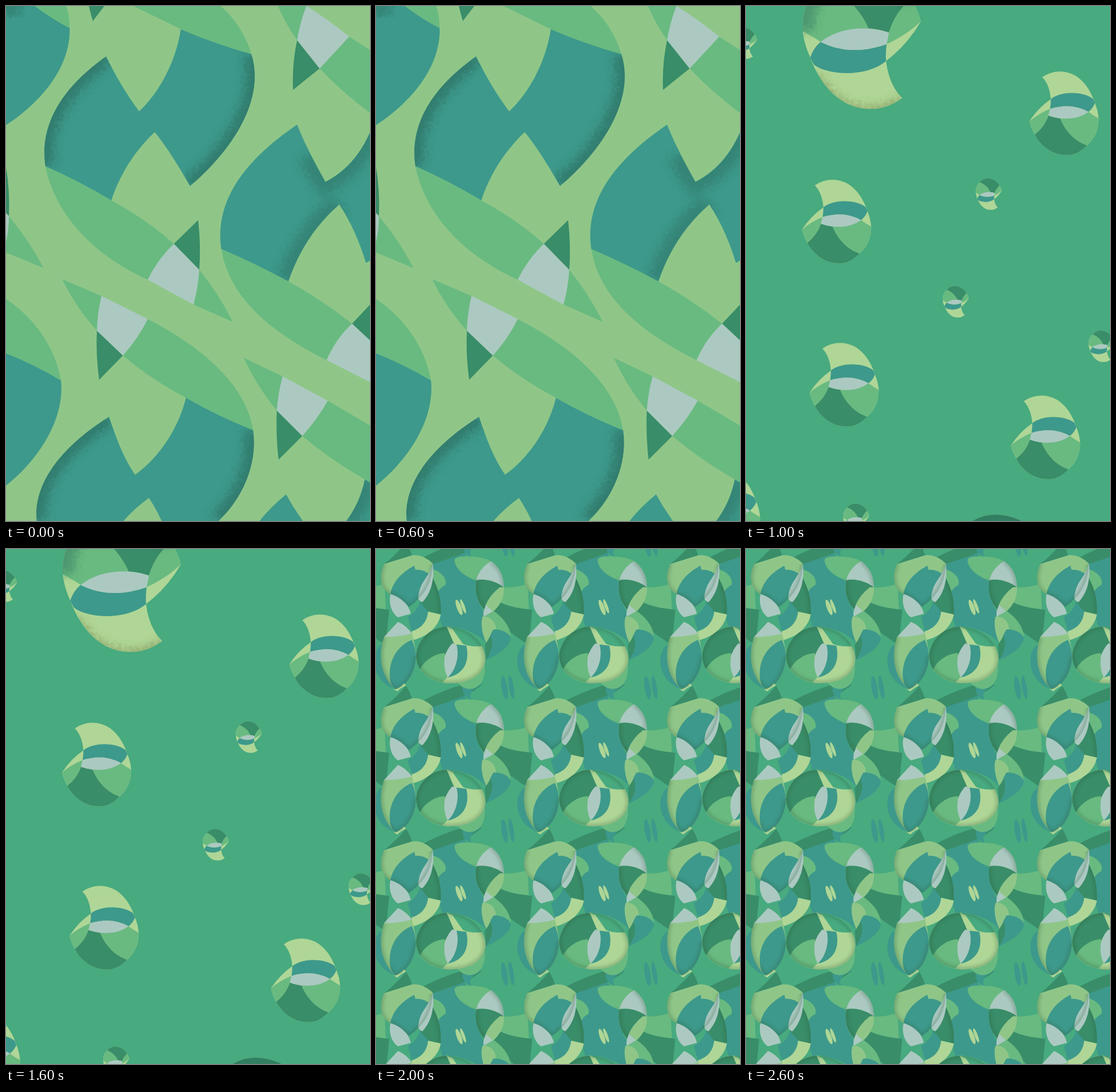
These frames come from a looping animation (629 px wide and 890 px high, 3 s). An HTML page:

```html
<!DOCTYPE html>
<html lang="en">
<head>
<meta charset="utf-8">
<title>Green patterns</title>
<style>
  html, body { margin: 0; width: 100%; height: 100%; overflow: hidden; background: #48aa7f; }
  svg { display: block; width: 100vw; height: 100vh; }
  .scene { visibility: hidden; animation: turn 3s step-end infinite; }
  .scene:nth-of-type(2) { animation-delay: -2s; }
  .scene:nth-of-type(3) { animation-delay: -1s; }
  @keyframes turn {
    0% { visibility: visible; }
    33.333%, 100% { visibility: hidden; }
  }
  .light { fill: #8fc688; }
  .teal { fill: #3d998b; }
  .mid { fill: #69ba80; }
  .dark { fill: #398d68; }
  .grey { fill: #abc9c1; }
  .lime { fill: #afd696; }
  .base { fill: #48aa7f; }
  .shade { fill: none; stroke: #2c6a5b; stroke-width: 32; opacity: .6; filter: url(#grain); }
  .faint { stroke-width: 40; opacity: .42; }
  .olive { stroke: #7d8a52; stroke-width: 20; }
  .soft { fill: none; stroke: #2f5a3c; stroke-width: 6; opacity: .36; filter: url(#blur); }
</style>
</head>
<body>
<svg viewBox="0 0 629 890" preserveAspectRatio="none">
  <defs>
    <filter id="grain" x="-50%" y="-50%" width="200%" height="200%">
      <feGaussianBlur stdDeviation="8" result="soft"/>
      <feTurbulence type="fractalNoise" baseFrequency=".18" numOctaves="2" seed="4"/>
      <feDisplacementMap in="soft" scale="18" xChannelSelector="R" yChannelSelector="G"/>
    </filter>
    <filter id="blur" x="-30%" y="-30%" width="160%" height="160%">
      <feGaussianBlur stdDeviation="3"/>
    </filter>

    <path id="leafA" d="M173 87C113 130 56 192 68 277Q125 302 182 336C195 295 222 250 257 218C280 246 300 280 318 311C385 255 450 165 424 83Q360 65 302 40C294 95 265 150 230 182C208 152 190 122 173 87Z"/>
    <path id="leafB" d="M503 205C430 255 358 325 372 420Q430 445 488 476C505 425 535 378 576 343C597 375 611 408 622 444L629 440V218C612 258 585 287 552 304C533 270 517 240 503 205Z"/>
    <path id="leafC" d="M178 710C104 756 46 820 53 890H203Q220 870 247 850Q260 870 269 890H367C410 850 435 790 427 733Q365 708 311 677C298 730 265 780 223 810C202 780 190 745 178 710Z"/>
    <path id="leafD" d="M620 818L629 823V890H588Q612 858 620 818Z"/>
    <path id="leafE" d="M0 0H50Q82 24 110 38C112 110 55 170 0 206Z"/>
    <clipPath id="inA"><use href="#leafA"/></clipPath>
    <clipPath id="inB"><use href="#leafB"/></clipPath>
    <clipPath id="inC"><use href="#leafC"/></clipPath>
    <clipPath id="inD"><use href="#leafD"/></clipPath>
    <clipPath id="inE"><use href="#leafE"/></clipPath>

    <path id="rim" d="M98 44C97 10 105 -15 129 -37C148 -60 170 -69 191 -69C235 -69 268 -42 285 -12Q298 8 302 27Q278 68 242 95Q247 137 270 159Q245 178 215 178C165 178 130 140 111 89Q101 68 98 44Z"/>
    <clipPath id="inRim"><use href="#rim"/></clipPath>
    <g id="ball">
      <use href="#rim" class="lime"/>
      <path class="mid" d="M98 44C97 10 105 -15 129 -37C165 -27 196 3 212 39Q160 42 129 62Q113 51 98 44Z"/>
      <path class="dark" d="M129 -37C148 -60 170 -69 191 -69C235 -69 268 -42 285 -12Q257 12 247 46Q230 40 212 39C196 3 165 -27 129 -37Z"/>
      <path class="mid" d="M285 -12Q298 8 302 27Q276 51 243 66L247 46Q257 12 285 -12Z"/>
      <path class="teal" d="M129 62Q116 73 111 89L117 101C142 121 210 123 242 95Q241 82 243 66Q180 88 129 62Z"/>
      <path class="grey" d="M129 62C160 37 208 33 247 46L243 66Q180 88 129 62Z"/>
    </g>
    <g id="bigBall">
      <use href="#ball"/>
      <g clip-path="url(#inRim)">
        <path class="shade olive" d="M118 122C142 166 178 186 215 184Q248 184 276 163"/>
        <path class="shade faint" d="M98 44C97 10 105 -15 129 -37C148 -60 170 -69 191 -69C235 -69 268 -42 285 -12"/>
      </g>
    </g>
    <use id="turned" href="#ball" transform="rotate(182.5) scale(.5834) translate(-302 -27)"/>
    <use id="tiny" href="#ball" transform="scale(.221) translate(-302 -27)"/>

    <g id="back">
      <path class="teal" d="M80 26L150 -13L155 13L136 20C140 45 165 50 173 56C170 90 185 100 190 120L192 165C178 146 150 134 115 136L105 100Z"/>
      <path class="dark" d="M65 24Q105 0 150 -13L183 -13Q165 4 130 15L70 36Z"/>
      <path class="teal" d="M150 -11Q147 8 165 13Q156 -1 183 -13Z"/>
      <path class="mid" d="M216 66Q240 68 262 60L264 104C240 102 220 96 207 88Z"/>
      <path class="dark" d="M207 88C222 98 240 102 270 105L264 166C240 150 215 135 203 107Z"/>
      <path class="teal" d="M10 165C-10 177 -10 225 30 241Z"/>
      <g class="lime">
        <ellipse cx="143.500" cy="101" rx="4" ry="14" transform="rotate(-20 143.500 101)"/>
        <ellipse cx="150.500" cy="99" rx="2.800" ry="13" transform="rotate(-20 150.500 99)"/>
      </g>
      <g class="teal">
        <ellipse cx="222" cy="240" rx="5" ry="20.500" transform="rotate(-9 222 240)"/>
        <ellipse cx="234" cy="239" rx="4" ry="20.500" transform="rotate(-9 234 239)"/>
      </g>
    </g>

    <path id="hoop" d="M62 11L14 26C4 48 8 70 25 78C35 80 48 90 57 100C83 82 98 58 98 25L70 35Z"/>
    <path id="egg" d="M38 126L14 152C4 180 6 220 35 243C55 235 68 210 69 185C68 170 65 155 62 146Q52 132 38 126Z"/>
    <path id="orb" d="M69 185C72 155 95 135 122 134C160 135 188 160 189 190C188 215 165 233 123 232C95 228 72 215 69 185Z"/>
    <path id="bean" d="M136 22C134 15 142 12 160 13Q185 13 199 21C212 30 221 45 221 66L216 66C215 75 208 85 202 90L190 108C178 94 170 82 173 54C155 48 138 35 136 22Z"/>
    <path id="cap" d="M98 50C108 70 113 85 112 113L90 108L76 91C90 77 97 65 98 50Z"/>
    <clipPath id="inHoop"><use href="#hoop"/></clipPath>
    <clipPath id="inEgg"><use href="#egg"/></clipPath>
    <clipPath id="inOrb"><use href="#orb"/></clipPath>
    <clipPath id="inBean"><use href="#bean"/></clipPath>
    <clipPath id="inCap"><use href="#cap"/></clipPath>

    <g id="front">
      <path class="dark" d="M14 26Q35 10 52 -11Q59 0 62 11Z"/>
      <use href="#hoop" class="teal"/>
      <path class="light" d="M62 11L14 26C4 48 8 70 25 78C28 58 44 40 68 28Z"/>
      <path class="light" d="M62 11Q80 8 98 25Q98 37 95 46Q82 34 68 36Z"/>
      <path class="mid" d="M97 35C114 39 123 52 120 62Q112 66 107 74L96 58Z"/>
      <path class="base" d="M57 100Q70 91 76 80L90 108L62 130L50 117Z"/>
      <path class="teal" d="M62 142C79 138 90 127 92 108L76 91Q72 107 55 118Z"/>
      <path class="lime" d="M112 113C108 135 88 152 62 158Q61 147 62 142C76 138 88 128 90 108Z"/>
      <use href="#cap" class="dark"/>
      <path class="grey" d="M98 25C102 54 94 78 80 92Q74 90 73 84C75 56 92 50 98 25Z"/>
      <path class="grey" d="M25 78C21 95 28 112 38 118L60 112C57 95 41 82 25 78Z"/>
      <g clip-path="url(#inHoop)"><path class="soft" d="M14 26C4 48 8 70 25 78C35 80 48 90 57 100C83 82 98 58 98 25"/></g>
      <g clip-path="url(#inCap)"><path class="soft" d="M98 50C108 70 113 85 112 113"/></g>

      <use href="#egg" class="light"/>
      <path class="grey" d="M38 126L14 152Q40 152 62 146Q52 132 38 126Z"/>
      <path class="teal" d="M62 157C30 170 18 205 26 232Q30 240 35 243C55 235 69 210 69 185Q68 170 62 157Z"/>
      <path class="lime" d="M31 243Q42 240 48 232L52 236Q44 239 37 246Z"/>
      <g clip-path="url(#inEgg)"><path class="soft" d="M14 152C4 180 6 220 35 243C55 235 68 210 69 185"/></g>

      <path class="mid" d="M188 198C190 225 180 242 160 242Q147 240 138 228C165 230 185 215 188 198Z"/>
      <use href="#orb" class="lime"/>
      <path class="dark" d="M69 185C72 155 95 135 122 134L135 164Q122 175 119 184L76 208Q70 198 69 185Z"/>
      <path class="mid" d="M76 208C85 190 105 180 119 180Q117 206 124 221L114 231Q89 226 76 208Z"/>
      <path class="base" d="M122 134C150 134 178 148 187 167C165 171 136 167 122 134Z"/>
      <path class="lime" d="M122 134L132 138L153 168L137 163Z"/>
      <path class="grey" d="M132 163C115 180 115 205 124 222C140 207 144 182 139 165Z"/>
      <path class="teal" d="M139 165C144 182 140 207 124 222C154 216 162 192 156 167Z"/>
      <g clip-path="url(#inOrb)"><use href="#orb" class="soft"/></g>

      <use href="#bean" class="mid"/>
      <path class="dark" d="M173 54C188 50 208 56 221 66L216 66C215 75 208 85 202 90L190 108C178 94 170 82 173 54Z"/>
      <path class="grey" d="M199 21C212 30 221 45 221 66C208 56 188 50 173 54C177 40 186 28 199 21Z"/>
      <g clip-path="url(#inBean)"><path class="soft" d="M199 21C212 30 221 45 221 66M190 108C178 94 170 82 173 54"/></g>
      <path class="light" d="M221 66C222 85 214 97 203 108L189 98Q196 80 214 66Z"/>
      <path class="grey" d="M190 97L203 108L186 118Q184 108 190 97Z"/>
      <path class="mid" d="M203 107C225 122 233 140 233 153Q218 140 203 139Q203 124 186 117Z"/>
      <path class="light" d="M184 117C195 115 208 125 207 140L192 165C184 150 180 130 184 117Z"/>
      <path class="teal" d="M203 139C220 138 233 148 233 155C230 170 212 182 190 192C188 175 195 150 203 139Z"/>
      <path class="dark" d="M188 166L198 150Q206 168 190 192Z"/>
    </g>
  </defs>

  <g class="scene">
    <rect class="light" width="629" height="890"/>
    <g class="teal">
      <use href="#leafA"/><use href="#leafB"/><use href="#leafC"/><use href="#leafD"/><use href="#leafE"/>
      <path d="M0 600Q50 620 95 647C102 715 55 785 0 829Z"/>
      <path d="M484 844Q458 865 438 890H513Q497 868 484 844Z"/>
    </g>
    <g clip-path="url(#inA)"><path class="shade" d="M173 87C113 130 56 192 68 277M318 311C385 255 450 165 424 83"/></g>
    <g clip-path="url(#inB)"><path class="shade faint" d="M629 218C612 258 585 287 552 304Q537 284 524 257M488 476C505 425 535 378 576 343"/></g>
    <g clip-path="url(#inC)"><path class="shade" d="M178 710C104 756 46 820 53 890M367 890C410 850 435 790 427 733"/></g>
    <g clip-path="url(#inD)"><path class="shade faint" d="M588 890Q612 858 620 818"/></g>
    <g clip-path="url(#inE)"><path class="shade faint" d="M-8 10L20 -12"/></g>
    <g class="mid">
      <path d="M220 0L302 40Q360 65 424 83C414 50 396 22 371 0Z"/>
      <path d="M68 277Q125 302 182 336Q245 370 290 411Q262 438 245 473C150 430 85 360 68 277Z"/>
      <path d="M334 456Q368 498 392 546L324 516Z"/>
      <path d="M372 420Q430 445 488 476Q545 507 598 549Q570 575 554 612C450 560 385 500 372 420Z"/>
      <path d="M245 541C340 590 415 655 427 733Q365 708 311 677Q250 645 202 604Q228 575 245 541Z"/>
      <path d="M97 472L165 501L157 561Q120 520 97 472Z"/>
      <path d="M411 608L478 640L468 699Q433 657 411 608Z"/>
      <path d="M556 682L629 725V823Q565 788 512 743Q538 714 556 682Z"/>
      <path d="M470 0H519L503 59Q483 31 470 0Z"/>
      <path d="M593 53L629 76V185Q582 150 542 108Z"/>
      <path d="M50 0H104Q110 18 110 38Q82 24 50 0Z"/>
      <path d="M5 363Q40 405 65 453L0 426V408Z"/>
      <path d="M0 506C50 540 85 590 95 647Q50 620 0 600Z"/>
    </g>
    <g class="dark">
      <path d="M332 370L290 411L334 456Q337 413 332 370Z"/>
      <path d="M157 561L202 604L161 646Q155 603 157 561Z"/>
      <path d="M468 699L512 743L471 784Q466 741 468 699Z"/>
      <path d="M503 59L542 108L496 145Q494 101 503 59Z"/>
      <path d="M629 516L598 549L629 578Z"/>
      <path d="M143 0L150 26L170 0Z"/>
      <path d="M0 278Q7 320 5 363L0 358Z"/>
    </g>
    <g class="grey">
      <path d="M290 411L334 456Q332 487 324 516L245 473Q262 438 290 411Z"/>
      <path d="M165 501L245 541Q228 575 202 604L157 561Q158 530 165 501Z"/>
      <path d="M478 640L556 682Q538 714 512 743L468 699Q470 669 478 640Z"/>
      <path d="M519 0Q558 24 593 53L542 108L503 59Q508 28 519 0Z"/>
      <path d="M598 549L629 578V650L554 612Q570 575 598 549Z"/>
      <path d="M0 358L5 363Q5 387 0 408Z"/>
    </g>
  </g>

  <g class="scene">
    <rect class="base" width="629" height="890"/>
    <use href="#bigBall"/>
    <use href="#bigBall" x="239" y="948"/>
    <use href="#turned" x="490" y="199"/>
    <use href="#turned" x="97" y="386"/>
    <use href="#turned" x="110" y="668"/>
    <use href="#turned" x="458" y="759"/>
    <use href="#turned" x="-95" y="888"/>
    <use href="#tiny" x="442" y="319"/>
    <use href="#tiny" x="385" y="505"/>
    <use href="#tiny" x="19" y="58"/>
    <use href="#tiny" x="637" y="582"/>
    <use href="#tiny" x="213" y="881"/>
  </g>

  <g class="scene" id="tiles">
    <rect class="base" width="629" height="890"/>
  </g>
</svg>
<script>
  const tiles = document.getElementById("tiles");
  const step = 247.2;

  function addTile(name, col, row) {
    const use = document.createElementNS("http://www.w3.org/2000/svg", "use");
    use.setAttribute("href", "#" + name);
    use.setAttribute("x", col * step);
    use.setAttribute("y", row * step);
    tiles.append(use);
  }

  for (const layer of ["back", "front"])
    for (let row = -1; row < 4; row++)
      for (let col = -1; col < 3; col++) addTile(layer, col, row);
</script>
</body>
</html>
```
